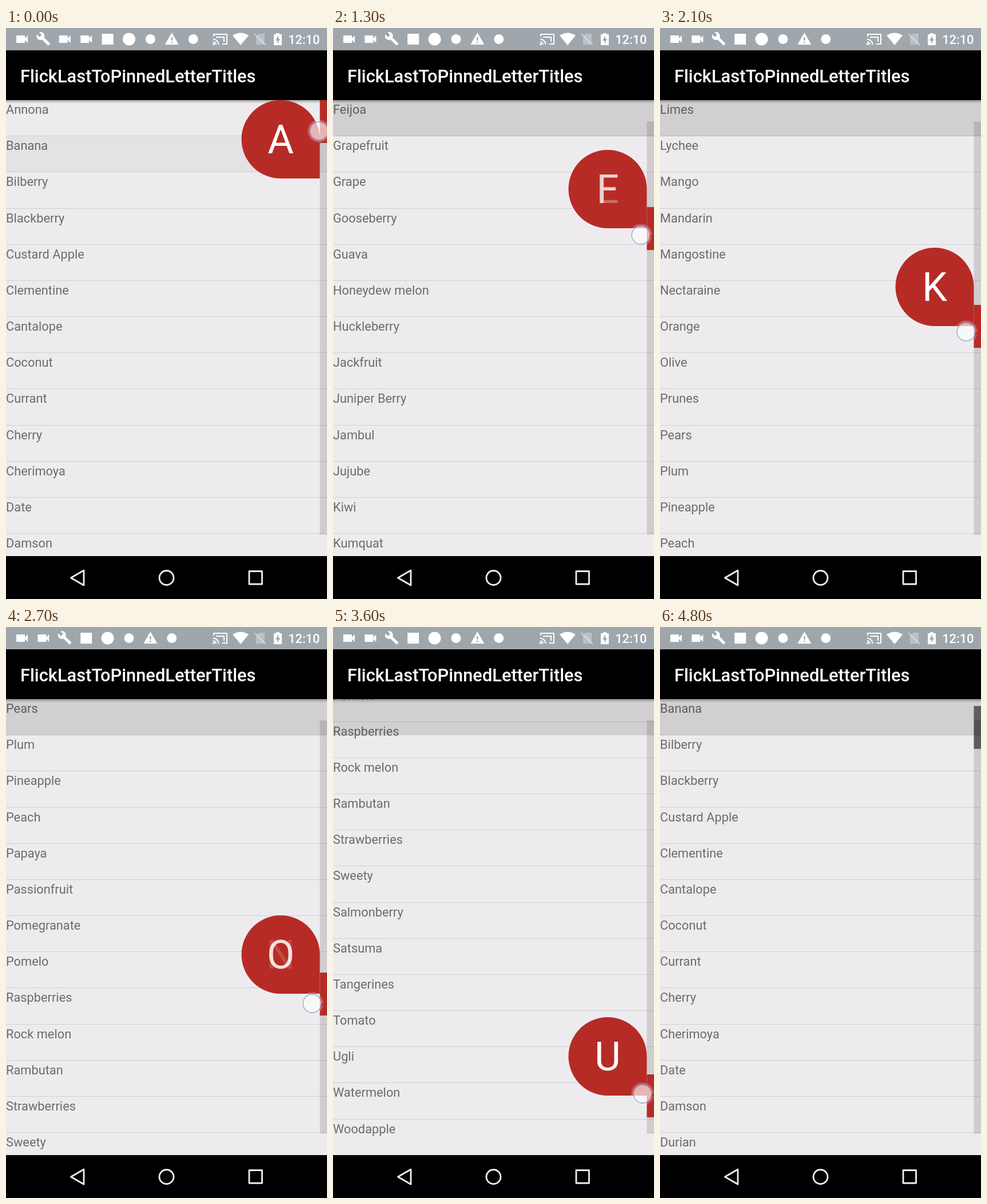
An HTML page with a canvas that plays this animation: 561 by 998 pixels, repeating every 5.1 s.

```html
<!DOCTYPE html>
<html lang="en">
<head>
<meta charset="utf-8">
<title>Fast scrolling fruit list</title>
<style>
html, body { margin: 0; width: 100%; height: 100%; overflow: hidden; background: #000; }
canvas { display: block; width: 561px; height: 998px; }
</style>
</head>
<body>
<canvas id="stage" width="561" height="998"></canvas>
<script>
const ctx = document.getElementById('stage').getContext('2d');
const W = 561, TOP = 126, BOTTOM = 923, ROW = 63.17;
const THUMB_H = 75, RANGE = BOTTOM - TOP - THUMB_H;
const LOOP = 5100, STEP = 100, FADE = 26;
const RED = '#b72b26', FONT = 'Roboto, sans-serif';

const fruits = ('Apple,Apricot,Avocado,Annona,Banana,Bilberry,Blackberry,Custard Apple,Clementine,' +
  'Cantalope,Coconut,Currant,Cherry,Cherimoya,Date,Damson,Durian,Elderberry,Fig,Feijoa,' +
  'Grapefruit,Grape,Gooseberry,Guava,Honeydew melon,Huckleberry,Jackfruit,Juniper Berry,' +
  'Jambul,Jujube,Kiwi,Kumquat,Lemons,Limes,Lychee,Mango,Mandarin,Mangostine,Nectaraine,' +
  'Orange,Olive,Prunes,Pears,Plum,Pineapple,Peach,Papaya,Passionfruit,Pomegranate,Pomelo,' +
  'Raspberries,Rock melon,Rambutan,Strawberries,Sweety,Salmonberry,Satsuma,Tangerines,' +
  'Tomato,Ugli,Watermelon,Woodapple').split(',');
const letters = [...new Set(fruits.map(f => f[0]))];
const END = 49.37;

// [time, thumb top]
const thumbKeys = [[0, 126], [600, 228], [1300, 313], [2100, 484], [2700, 604], [3000, 672],
  [3500, 784], [3600, 782], [4100, 451], [4500, 187], [4600, 150], [4700, 138], [5100, 138]];
// [time, x, y]
const touchKeys = [[0, 547, 180], [600, 542, 279], [1300, 538, 362], [2100, 535, 531],
  [2700, 535, 658], [3000, 536, 724], [3500, 540, 832], [3600, 541, 816],
  [4100, 537, 432], [4700, 543, 150]];

function along(keys, t, col = 1) {
  let i = 1;
  while (i < keys.length - 1 && t > keys[i][0]) i++;
  const a = keys[i - 1], b = keys[i];
  const k = Math.max(0, Math.min(1, (t - a[0]) / (b[0] - a[0])));
  return a[col] + (b[col] - a[col]) * k;
}

const thumbAt = t => along(thumbKeys, t);
const progressAt = t => (thumbAt(t) - TOP) / RANGE;

function letterAt(t) {
  const i = Math.floor(progressAt(Math.max(0, t)) * letters.length - 0.12);
  return letters[Math.max(0, Math.min(letters.length - 1, i))];
}

function rowAt(t) {
  const row = Math.floor(3.9 + 59 * progressAt(t));
  return row >= 48 ? END : row;
}

function rect(x, y, w, h, fill) {
  ctx.fillStyle = fill;
  ctx.fillRect(x, y, w, h);
}

function disc(x, y, r, fill) {
  ctx.fillStyle = fill;
  ctx.beginPath();
  ctx.arc(x, y, r, 0, 7);
  ctx.fill();
}

function poly(points, fill) {
  ctx.beginPath();
  points.forEach(([x, y]) => ctx.lineTo(x, y));
  ctx.closePath();
  if (fill) {
    ctx.fillStyle = fill;
    ctx.fill();
  }
}

function text(s, x, y, font, fill, align = 'left') {
  ctx.font = font + ' ' + FONT;
  ctx.textAlign = align;
  ctx.fillStyle = fill;
  ctx.fillText(s, x, y);
}

const icons = {
  camera(x) {
    rect(x - 10, 13, 15, 13, '#fff');
    poly([[x + 5, 18], [x + 10, 13], [x + 10, 26], [x + 5, 21]], '#fff');
  },
  wrench(x) {
    ctx.strokeStyle = '#fff';
    ctx.lineWidth = 5;
    ctx.beginPath();
    ctx.moveTo(x - 3, 16);
    ctx.lineTo(x + 10, 29);
    ctx.stroke();
    disc(x - 5, 14, 7, '#fff');
    poly([[x - 13, 9], [x - 9, 6], [x - 3, 12], [x - 7, 16]], '#9fa7ad');
  },
  square(x) { rect(x - 10, 10, 20, 19, '#fff'); },
  dot(x) { disc(x, 19.5, 11, '#fff'); },
  small(x) { disc(x, 19.5, 8.5, '#fff'); },
  warning(x) {
    poly([[x, 8], [x + 12, 29], [x - 12, 29]], '#fff');
    rect(x - 1.2, 16, 2.4, 6, '#9fa7ad');
    rect(x - 1.2, 24, 2.4, 2.4, '#9fa7ad');
  }
};

function drawStatus(t) {
  rect(0, 0, W, 39, '#9fa7ad');
  const rest = ['square', 'dot', 'small', 'warning', 'small'];
  const lead = t < 300 ? ['camera', 'wrench', 'camera', 'camera'] : ['camera', 'camera', 'wrench'];
  lead.concat(rest).forEach((name, i) => icons[name](28 + i * 37.4));

  // cast
  ctx.strokeStyle = '#fff';
  ctx.lineWidth = 2;
  ctx.beginPath();
  ctx.moveTo(363, 15);
  ctx.lineTo(363, 11);
  ctx.lineTo(386, 11);
  ctx.lineTo(386, 28);
  ctx.lineTo(378, 28);
  ctx.stroke();
  for (const r of [5, 9.5]) {
    ctx.beginPath();
    ctx.arc(362, 29, r, -Math.PI / 2, 0);
    ctx.stroke();
  }
  rect(367, 15, 15, 2, '#fff');
  rect(380, 15, 2, 9, '#fff');
  disc(363, 28, 2, '#fff');

  // wifi
  ctx.fillStyle = '#fff';
  ctx.beginPath();
  ctx.moveTo(410, 30);
  ctx.lineTo(396, 13);
  ctx.quadraticCurveTo(410, 4, 424, 13);
  ctx.fill();

  // missing card
  poly([[437, 15], [442, 10], [452, 10], [452, 29], [437, 29]], 'rgba(255,255,255,.3)');
  ctx.strokeStyle = 'rgba(255,255,255,.45)';
  ctx.beginPath();
  ctx.moveTo(434, 10);
  ctx.lineTo(454, 30);
  ctx.stroke();

  // battery
  rect(468, 11, 14, 19, '#fff');
  rect(472, 9, 6, 3, '#fff');
  poly([[476, 13], [471, 22], [474.5, 22], [474.5, 28], [479, 19], [476, 19]], '#9fa7ad');
  text('12:10', 548.5, 28, '500 21.8px', '#fff', 'right');
}

function drawList(t) {
  const first = rowAt(t);
  rect(0, TOP, W, BOTTOM - TOP, '#eeebee');
  for (let i = Math.floor(first); i < fruits.length; i++) {
    const y = TOP + (i - first) * ROW;
    if (y > BOTTOM) break;
    text(fruits[i], 0, y + 24, '400 21.8px', '#6d6b6e');
    if (i < fruits.length - 1) rect(0, Math.round(y + ROW) - 1, W, 1, '#d2cfd2');
  }
  if (t < 200) rect(0, TOP + ROW, W, ROW - 1, 'rgba(0,0,0,.04)');
  else rect(0, TOP, W, ROW, 'rgba(0,0,0,.12)');

  const shade = ctx.createLinearGradient(0, TOP, 0, TOP + 6);
  shade.addColorStop(0, 'rgba(0,0,0,.3)');
  shade.addColorStop(1, 'rgba(0,0,0,0)');
  rect(0, TOP, W, 6, shade);
}

function drawBubble(t, y) {
  const r = 68.5, x = 411.5;
  ctx.fillStyle = RED;
  ctx.beginPath();
  ctx.arc(x + r, y + r, r, Math.PI / 2, Math.PI * 2);
  ctx.lineTo(x + 2 * r, y + 2 * r);
  ctx.closePath();
  ctx.fill();

  const now = letterAt(t), old = letterAt(t - STEP);
  let age = 0;
  while (age < FADE && letterAt(t - age) === now) age++;
  const mix = old === now ? 1 : age / FADE;
  const put = (s, alpha) => {
    ctx.globalAlpha = alpha;
    text(s, 480, y + 93, '400 70px', '#fff', 'center');
  };
  if (mix < 1) put(old, 1 - mix);
  put(now, mix);
  ctx.globalAlpha = 1;
}

function drawTouch(t) {
  const x = along(touchKeys, t, 1), y = along(touchKeys, t, 2);
  const glow = ctx.createRadialGradient(x, y, 15, x, y, 21);
  glow.addColorStop(0, 'rgba(255,255,255,.5)');
  glow.addColorStop(1, 'rgba(255,255,255,0)');
  ctx.fillStyle = glow;
  ctx.beginPath();
  ctx.arc(x, y, 21, 0, 7);
  ctx.arc(x, y, 16, 0, 7, true);
  ctx.fill('evenodd');
  disc(x, y, 16, 'rgba(255,255,255,.65)');
  ctx.strokeStyle = 'rgba(110,130,180,.55)';
  ctx.lineWidth = 1.8;
  ctx.beginPath();
  ctx.arc(x, y, 16, 0, 7);
  ctx.stroke();
}

function drawScroller(t) {
  const y = thumbAt(t), held = t < 4800;
  rect(548.5, TOP + THUMB_H / 2, 12.5, RANGE, 'rgba(0,0,0,.13)');
  rect(548.5, y, 12.5, THUMB_H, held ? RED : 'rgba(0,0,0,.545)');
  if (held) drawBubble(t, Math.max(TOP, y - 100));
  if (t < 4700) drawTouch(t);
}

function drawBars() {
  rect(0, 39, W, TOP - 39, '#000');
  text('FlickLastToPinnedLetterTitles', 25, 95, '500 30.8px', '#fff');
  rect(0, BOTTOM, W, 998 - BOTTOM, '#000');
  ctx.strokeStyle = '#f0f0f0';
  ctx.lineWidth = 2.8;
  ctx.lineJoin = 'round';
  poly([[113.5, 961], [136, 948], [136, 974]]);
  ctx.stroke();
  ctx.beginPath();
  ctx.arc(280.5, 961, 12.5, 0, 7);
  ctx.stroke();
  ctx.strokeRect(425, 949.5, 22.5, 22.5);
}

function draw(time) {
  const t = Math.floor((time % LOOP) / STEP) * STEP;
  drawList(t);
  drawBars();
  drawStatus(t);
  drawScroller(t);
}

let start;
function tick(now) {
  if (start === undefined) start = now;
  draw(now - start);
  requestAnimationFrame(tick);
}
draw(0);
requestAnimationFrame(tick);
</script>
</body>
</html>
```
